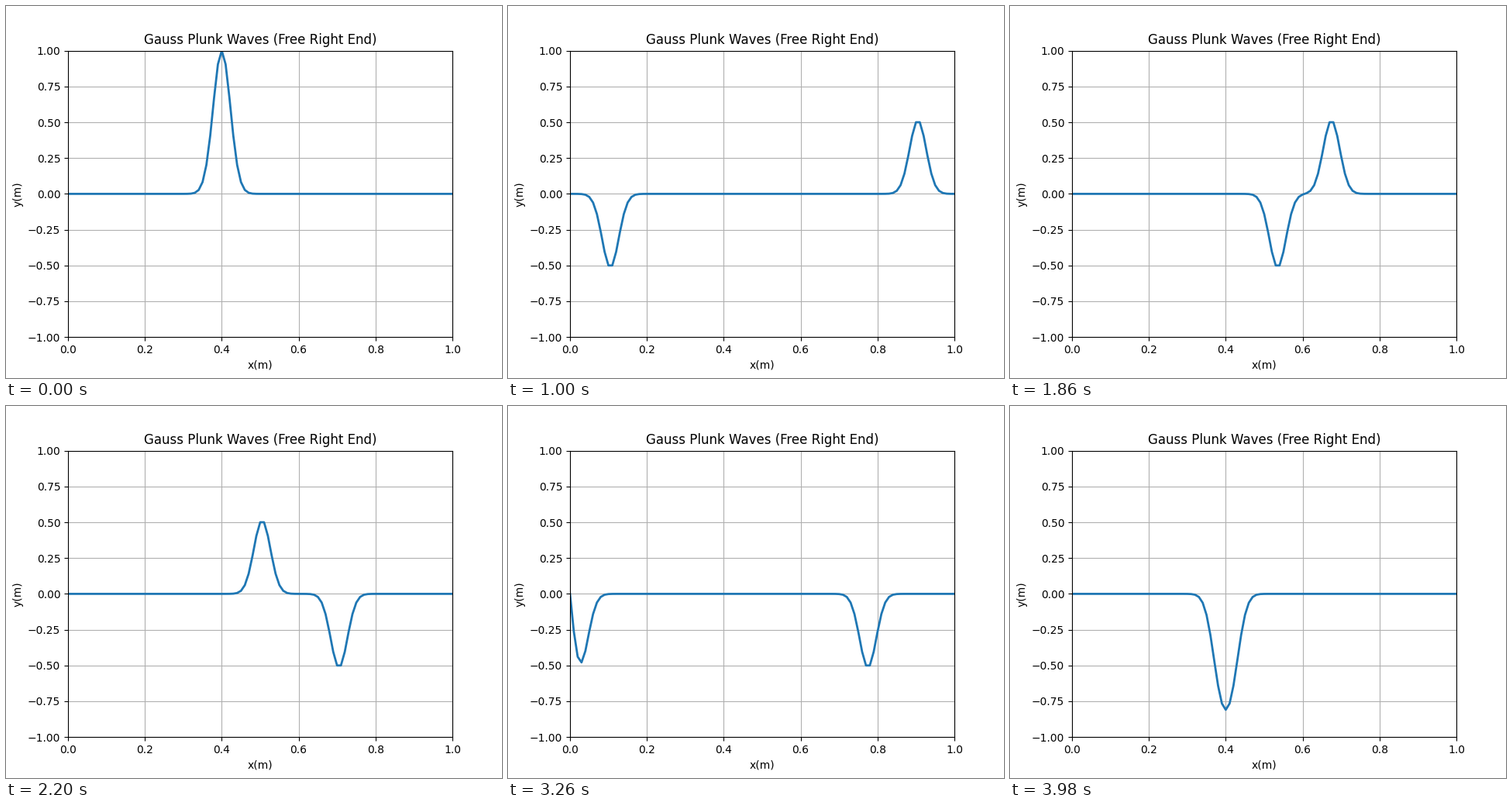
A matplotlib script for the animation above (4 s loop, 640 px wide and 480 px high).

```python
import numpy as np
import matplotlib.pyplot as plt
from matplotlib.animation import FuncAnimation

FRAMES = 200
INTERVAL = 20  # ms

plt.rcParams["font.family"] = "DejaVu Sans"

x = np.linspace(0, 1, 101)


def simulate(steps):
    """Leapfrog wave equation, one cell per step: fixed left, free right end."""
    prev = np.exp(-1000 * (x - 0.4) ** 2)
    cur = prev.copy()
    states = []
    for _ in range(steps):
        states.append(cur)
        right = np.append(cur[1:], cur[-1])
        left = np.append(0, cur[:-1])
        nxt = left + right - prev
        nxt[0] = 0
        prev, cur = cur, nxt
    return states


waves = simulate(FRAMES)

fig, ax = plt.subplots(figsize=(6.4, 4.8), dpi=100)
line, = ax.plot(x, waves[0], color="#1f77b4", lw=2)
ax.set(xlim=(0, 1), ylim=(-1, 1), xlabel="x(m)", ylabel="y(m)",
       title="Gauss Plunk Waves (Free Right End)")
ax.grid(True)


def update(i):
    line.set_ydata(waves[i])
    return line,


anim = FuncAnimation(fig, update, frames=FRAMES, interval=INTERVAL,
                     repeat=True, repeat_delay=0)
plt.show()
```
